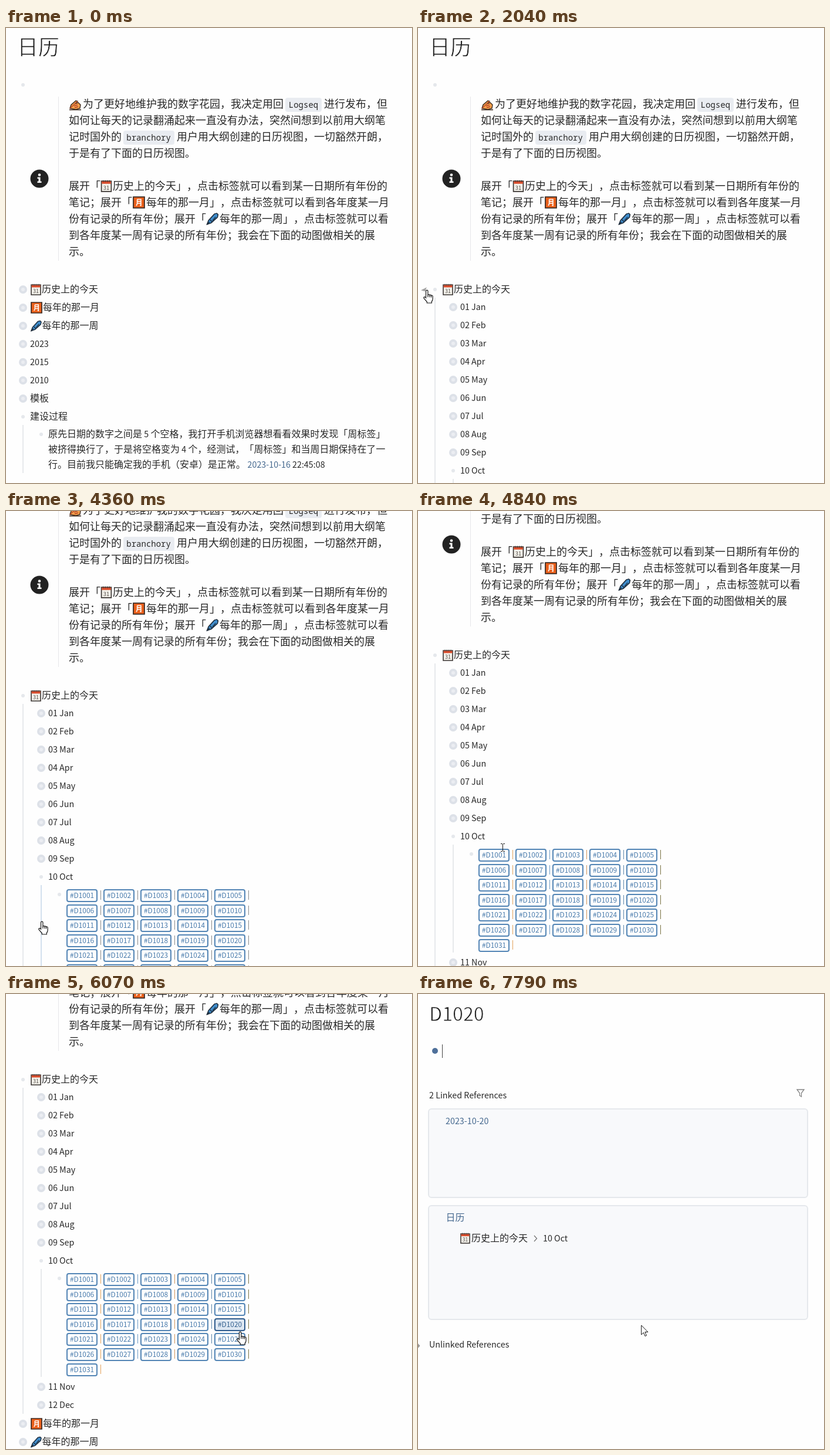
Recreate the animation shown at these times as an HTML page. Size 692x776 px, loop 8000 ms.

```html
<!DOCTYPE html>
<html lang="zh-CN">
<head>
<meta charset="utf-8">
<title>日历</title>
<style>
html, body { margin: 0; width: 100%; height: 100%; overflow: hidden; background: #fefefe; }
#stage { position: relative; width: 692px; height: 776px; overflow: hidden; color: #282828;
  font-family: "Noto Sans CJK SC", "Noto Sans CJK", "Noto Sans CJK JP", "Noto Sans", sans-serif;
  text-spacing-trim: space-all; }
#stage div, #stage svg { position: absolute; }
.t { white-space: pre; line-height: 30px; }
.l { font-size: .895em; line-height: 0; }
/* the pale stroke thins the strokes of the heading */
.title { font-weight: 300; color: #1c1c1c; -webkit-text-stroke: .8px #fefefe; }
.link { color: #46698f; }
.strong { font-weight: 500; }
.chip { height: 24px; padding: 0 5.8px; border-radius: 4px; background: #e9ecf1;
  font: 14px/24px "Noto Sans Mono", monospace; }
.dot { width: 6px; height: 6px; border-radius: 50%; background: #e5e8ec; transform: translate(-3px, -3px); }
.dot.shut { background: #ebedf2; box-shadow: 0 0 0 4px #dde1e8; }
.dot.focus { width: 10px; height: 10px; background: #4f709a; transform: translate(-5px, -5px); }
.line { width: 2px; background: #e7e9ec; }
.line.hot { background: #d3e0ee; }
.tag { box-sizing: border-box; width: 53px; height: 22px; border: 2px solid #5385b5; border-radius: 4px;
  color: #4679ab; background: #fefefe; font-size: 11.9px; font-weight: 500; line-height: 16px; text-align: center; }
.tag.hot { background: #dde7f2; border-color: #2f5c8d; color: #34618f; }
.bar { width: 1px; height: 16px; }
.plain .bar { background: #8b8b8b !important; }
.card { box-sizing: border-box; width: 648px; border: 2px solid #e5e8ec; border-radius: 6px; background: #f8f9fb; }
</style>
</head>
<body>
<div id="stage">
  <svg width="0" height="0">
    <symbol id="cal" viewBox="0 0 18 20">
      <path d="M1 2h16v17H1z" fill="#f3f1ea" stroke="#3a3532" stroke-width="1.6"/>
      <path d="M1.6 2.4h14.8v4H1.6z" fill="#dc4e2d"/>
      <path d="M4 .5v3M7.3.5v3M10.7.5v3M14 .5v3" stroke="#3a3532"/>
      <text x="9" y="15.8" font-size="9" text-anchor="middle" fill="#55504c">31</text>
    </symbol>
    <symbol id="month" viewBox="0 0 20 20">
      <path d="M1 1h18v18H1z" fill="#e9601c" stroke="#3b2a22" stroke-width="1.7"/>
      <path d="M7.3 5h6v10l-1.6-.3M7.3 5v6q0 3-1.8 4M7.3 8.2h6M7.3 11.4h6" fill="none" stroke="#fff" stroke-width="1.5"/>
    </symbol>
    <symbol id="pen" viewBox="0 0 20 20">
      <path d="M1 19l2.5-6.5L13 2l4-1 2 2-1 4.500L8 16.500z" fill="#3f8ccb" stroke="#1d2b3a" stroke-width="1.5"/>
      <path d="M1 19l4-4M6 11.500l3.500 3.500M15 7l-5 6" stroke="#1d2b3a" stroke-width="1.4"/>
    </symbol>
    <symbol id="write" viewBox="0 0 22 20">
      <path d="M1 18.500h20" stroke="#3c2a1e" stroke-width="1.6"/>
      <path d="M2 16l2-6 8-7 3 1-4 4 5-2 4 4-1 6-7 2z" fill="#f5a04a" stroke="#3c2a1e" stroke-width="1.4"/>
      <path d="M2 16l13-12M9 12l6-2M10 15l6-2" stroke="#b5452b" stroke-width="1.4"/>
    </symbol>
  </svg>

  <div id="page">
    <div id="intro"></div>
    <div id="closed"></div>
    <div id="open"></div>
    <svg id="caret" width="12" height="12" viewBox="-6 -6 12 12"><path d="M-2.500-5.500L2.500 0-2.500 5.500z" fill="#a3a3a3"/></svg>
  </div>
  <div id="result"><div id="refs"></div></div>

  <svg id="hand" width="18" height="24" fill="#fff" stroke="#151515" stroke-width="1.2">
    <path d="M4.500 13V2.800a1.700 1.700 0 0 1 3.400 0V9q1.600-.9 3 .3 1.500-.6 2.600.6 2-.3 2.600 1.200V16q0 2.500-1.800 4.500V23H6.300v-2L1.200 15.200q-1-2 .8-2.600 1.300 0 2.500 1.600z"/>
    <path d="M7.900 9v4M10.900 9.300v4M13.500 9.900v3.500"/>
  </svg>
  <svg id="arrow" width="14" height="22" fill="#fff" stroke="#151515">
    <path d="M.7 1v16l3.700-3.500 2.600 6 2.500-1-2.600-6h5z"/>
  </svg>
  <svg id="beam" width="9" height="16" fill="none" stroke="#151515">
    <path d="M1 1.500h2.500l1 1 1-1H8M4.500 2v12M1 14.500h2.500l1-1 1 1H8"/>
  </svg>
</div>
<script>
const $ = id => document.getElementById(id);
const put = (id, ...parts) => $(id).insertAdjacentHTML('beforeend', parts.flat().join(''));
const range = n => [...Array(n).keys()];

const box = (cls, x, y, extra = '', body = '') =>
  `<div class="${cls}" style="left:${x}px;top:${y}px;${extra}">${body}</div>`;
// y is the middle of the text line
const text = (x, y, s, cls = '', size = 16) =>
  box('t ' + cls, x, y - 15, `font-size:${size}px`, s.replace(/[ -~]+/g, m => `<span class="l">${m}</span>`));
const icon = (id, x, y, w, h = 20) =>
  `<svg style="left:${x}px;top:${y}px" width="${w}" height="${h}"><use href="#${id}"/></svg>`;
const dot = (x, y, cls = '') => box('dot ' + cls, x, y);
const line = (x, y, h, cls = '') => box('line ' + cls, x, y, `height:${h}px`);
const row = (x, y, s, cls = 'shut') => dot(x, y + 2, cls) + text(x + 12, y, s);
const iconRow = (id, y, w, tx, s, cls = 'shut') =>
  dot(29, y + 2, cls) + icon(id, 42, y - 8, w) + text(tx, y, s);
const dayRow = (y, cls) => iconRow('cal', y, 18, 61, '历史上的今天', cls);
const moreRows = y => iconRow('month', y, 20, 63, '每年的那一月') + iconRow('pen', y + 31, 19, 61.5, '每年的那一周');

const quote = [
  [131, 0, '为了更好地维护我的数字花园，我决定用回'],
  [542, 0, '进行发布，但'],
  [107, 1, '如何让每天的记录翻涌起来一直没有办法，突然间想到以前用大纲笔'],
  [107, 2, '记时国外的'],
  [291, 2, '用户用大纲创建的日历视图，一切豁然开朗，'],
  [107, 3, '于是有了下面的日历视图。'],
  [107, 5, '展开「'],
  [182, 5, '历史上的今天」，点击标签就可以看到某一日期所有年份的'],
  [107, 6, '笔记；展开「'],
  [239, 6, '每年的那一月」，点击标签就可以看到各年度某一月'],
  [107, 7, '份有记录的所有年份；展开「'],
  [364, 7, '每年的那一周」，点击标签就可以看'],
  [107, 8, '到各年度某一周有记录的所有年份；我会在下面的动图做相关的展'],
  [107, 9, '示。'],
];
put('intro',
  text(19, 30, '日历', 'title', 36), dot(29, 97),
  box('', 89, 117, 'width:1px;height:280px;background:#e6e7ea'),
  `<svg style="left:41px;top:241px" width="32" height="32"><circle cx="16" cy="16" r="15.500" fill="#222"/>
   <circle cx="16" cy="9.500" r="2.300" fill="#fff"/><path d="M12.500 13.500h5v7h2v2.500h-7v-2.500h2v-4.500h-2z" fill="#fff"/></svg>`,
  quote.map(([x, n, s]) => text(x, 128 + 28 * n, s, '', 18)),
  box('chip', 476, 119, '', 'Logseq'), box('chip', 199.5, 175, '', 'branchory'),
  icon('write', 107, 121, 22), icon('cal', 161, 259, 20, 21),
  icon('month', 216, 287, 21, 21), icon('pen', 341, 315, 22, 21));

put('closed', dayRow(444, 'shut'), moreRows(475),
  ['2023', '2015', '2010', '模板'].map((s, i) => row(29, 537 + 31 * i, s)),
  row(29, 661, '建设过程', ''), line(28, 677, 82), dot(60, 693),
  text(72, 691, '原先日期的数字之间是 5 个空格，我打开手机浏览器想看看效果时发现「周标签」'),
  text(72, 717, '被挤得换行了，于是将空格变为 4 个，经测试，「周标签」和当周日期保持在了一'),
  text(72, 743, '行。目前我只能确定我的手机（安卓）是正常。'),
  text(411.5, 743, '2023-10-16', 'link'), text(488, 743, '22:45:08'));

const months = 'Jan Feb Mar Apr May Jun Jul Aug Sep Oct Nov Dec'.split(' ');
const barColors = ['#e3a35c', '#6f9cc6', '#cf935c', '#5d87ac', '#7b7444'];
const GRID_TOP = 776, GRID_PITCH = 25.6, GRID_HEIGHT = 184;
put('open', dayRow(444, ''), line(28, 460, 556), line(59, 769, GRID_HEIGHT, 'days'),
  months.map((m, i) => row(60, 474 + 31 * i + (i > 9 ? GRID_HEIGHT : 0), `${i + 1}`.padStart(2, 0) + ' ' + m, i == 9 ? '' : 'shut')),
  dot(91, 785),
  range(31).map(i => {
    const x = 103 + 63 * (i % 5), y = Math.round(GRID_TOP + GRID_PITCH * Math.floor(i / 5));
    return box('tag', x, y, '', '#D' + (1001 + i)) + box('bar', x + 58, y + 2, 'background:' + barColors[i % 5]);
  }), moreRows(1031));

put('result', text(19, 30, 'D1020', 'title', 36), dot(29, 97, 'focus'),
  box('', 41, 86, 'width:1px;height:23px;background:#444'));
put('refs', text(19, 171, '2 Linked References', 'strong'),
  `<svg style="left:645px;top:162px" width="14" height="15" fill="none" stroke="#858585" stroke-width="1.300"><path d="M1 1h12L8.500 7v6l-3-1.800V7z"/></svg>`,
  box('card', 17, 195, 'height:153px'), box('card', 17, 360, 'height:196px'),
  text(47, 215, '2023-10-20', 'link'), text(47.5, 380, '日历', 'link'),
  icon('cal', 72, 407, 17, 19), text(91, 415, '历史上的今天'),
  `<svg style="left:196px;top:411px" width="9" height="12" fill="none" stroke="#777" stroke-width="1.300"><path d="M2 1l4.500 5L2 11"/></svg>`,
  text(213, 415, '10 Oct'), text(19, 596, 'Unlinked References', 'strong'),
  `<svg style="left:0;top:595px" width="4" height="10"><path d="M0 1l3.500 4L0 9z" fill="#999"/></svg>`);

const LOOP = 8000, STEP = 67.5;
const starts = [0, 70, 1290, 1840, 2770, 4090, 4970, 5800, 6630, 7380];
const scrollKeys = [[4089, 0], [4090, 23], [4360, 131], [4570, 182], [4700, 200], [4960, 200], [5250, 300]];
const pointerKeys = [[0, 190, 800], [70, 180, 790], [810, 15, 447], [2770, 15, 447], [3510, 61, 700], [4500, 61, 700],
  [4830, 144, 574], [5250, 144, 574], [5710, 386, 492], [6070, 399, 576], [6540, 380, 564]];

function track(keys, t) {
  const n = keys.findIndex(k => k[0] > t);
  if (n < 0) return keys.at(-1).slice(1);
  if (n == 0) return keys[0].slice(1);
  const a = keys[n - 1], b = keys[n], p = (t - a[0]) / (b[0] - a[0]);
  return a.slice(1).map((v, i) => v + (b[i + 1] - v) * p);
}
function stepped(t) {
  const s = starts.findLast(v => v <= t);
  return s + Math.floor((t - s) / STEP) * STEP;
}
const show = (el, on) => el.style.visibility = on ? 'visible' : 'hidden';
const tags = [...document.querySelectorAll('.tag')];
const days = document.querySelector('.days');

function draw(time) {
  const t = stepped(time);
  const scroll = Math.round(track(scrollKeys, t)[0]);
  const [x, y] = track(pointerKeys, t).map(Math.round);
  const expanded = t >= 1900, onResult = t >= 7380;

  $('page').style.transform = `translateY(${-scroll}px)`;
  $('page').style.display = onResult ? 'none' : '';
  $('result').style.display = onResult ? '' : 'none';
  $('closed').style.display = expanded ? 'none' : '';
  $('open').style.display = expanded ? '' : 'none';
  show($('refs'), t >= 7560);

  const moving = t > 4100 && t < 4700;
  $('open').classList.toggle('plain', moving);
  days.classList.toggle('hot', moving && t < 4560);

  const col = Math.floor((x - 103) / 63), gridRow = Math.floor((y + scroll - GRID_TOP) / GRID_PITCH);
  const inTag = t > 4850 && !onResult && col >= 0 && col < 5 && gridRow >= 0 && (x - 103) % 63 < 53;
  const hot = inTag ? gridRow * 5 + col : -1;
  tags.forEach((el, i) => el.classList.toggle('hot', i == hot));

  const onRoot = t >= 690 && t < 2840;
  const month = Math.round((y - 476) / 31);
  const turn = Math.min(1, Math.max(0, (t - 1840) / 190));
  const [cx, cy] = onRoot ? [11, 447] : [41, 477 + 31 * month];
  $('caret').style.transform = `translate(${cx - 6}px,${cy - 6}px) rotate(${onRoot ? 90 * turn : 0}deg)`;
  show($('caret'), onRoot || t >= 2840 && t < 4150 && month >= 0);

  const kind = onResult || t < 690 ? 'arrow' : t >= 4640 && t < 5730 && hot < 0 ? 'beam' : 'hand';
  for (const [id, dx, dy] of [['hand', 6, 1], ['arrow', 0, 0], ['beam', 4, 8]]) {
    $(id).style.transform = `translate(${x - dx}px,${y - dy}px)`;
    show($(id), id == kind);
  }
}

const t0 = performance.now();
function tick() {
  draw((performance.now() - t0) % LOOP);
  requestAnimationFrame(tick);
}
tick();
</script>
</body>
</html>
```
